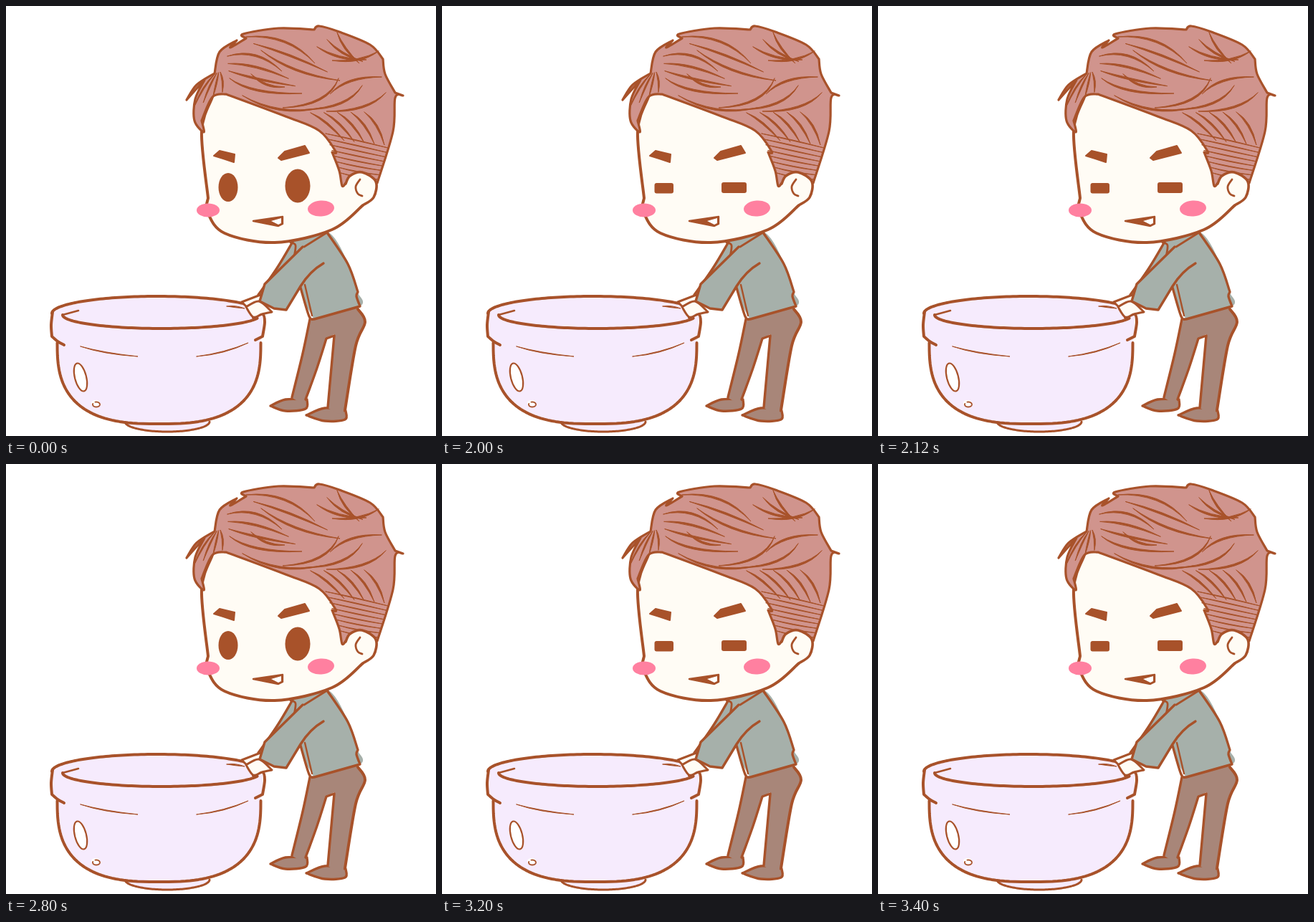
Animation of 600x600 px, one loop 3500 ms. Source, as an HTML page with a canvas:

```html
<!DOCTYPE html>
<html lang="en">
<head>
<meta charset="utf-8">
<title>Blinking beside a bowl</title>
<style>
html, body { margin: 0; width: 100%; height: 100%; overflow: hidden; background: #fff; }
canvas { display: block; width: 100vw; height: 100vh; }
</style>
</head>
<body>
<canvas id="stage" width="600" height="600"></canvas>
<script>
const ctx = document.getElementById('stage').getContext('2d');
const INK = '#a8522a', SKIN = '#fffcf5', HAIR = '#d0948d', SHIRT = '#a6b0aa';
const TROUSERS = '#a88679', BOWL = '#f6ebfd', BLUSH = '#ff80a0';
const LOOP = 3500;
const BLINKS = [[2000, 2200], [3200, 3300], [3400, 3500]];

// Smooth curve through "x,y" points; "|" makes the point before it a corner.
function curve(text) {
  const path = new Path2D();
  let last = null;
  for (const part of text.split('|')) {
    const pts = part.trim().split(/\s+/).map(p => p.split(',').map(Number));
    if (last) pts.unshift(last);
    else path.moveTo(...pts[0]);
    for (let i = 0; i < pts.length - 1; i++) {
      const a = pts[i - 1] || pts[i], b = pts[i], c = pts[i + 1], d = pts[i + 2] || c;
      path.bezierCurveTo(b[0] + (c[0] - a[0]) / 6, b[1] + (c[1] - a[1]) / 6,
        c[0] - (d[0] - b[0]) / 6, c[1] - (d[1] - b[1]) / 6, c[0], c[1]);
    }
    last = pts[pts.length - 1];
  }
  return path;
}

// Arc of a superellipse; power 2 is a plain ellipse.
function arc(x, y, rx, ry, from, to, power = 2) {
  const path = new Path2D(), steps = 80;
  const bend = v => Math.sign(v) * Math.abs(v) ** (2 / power);
  for (let i = 0; i <= steps; i++) {
    const a = Math.PI * (from + (to - from) * i / steps);
    path.lineTo(x + rx * bend(Math.cos(a)), y + ry * bend(Math.sin(a)));
  }
  return path;
}

function fill(path, color) {
  ctx.fillStyle = color;
  ctx.fill(path);
}

function line(path, width = 3.4) {
  ctx.strokeStyle = INK;
  ctx.lineWidth = width;
  ctx.stroke(path);
}

function shape(path, color, width) {
  fill(path, color);
  line(path, width);
}

function oval(x, y, rx, ry, color, turn = 0) {
  const path = new Path2D();
  path.ellipse(x, y, rx, ry, turn, 0, 2 * Math.PI);
  fill(path, color);
}

// Brush stroke, pointed at both ends, bent towards (cx, cy).
function strand([x0, y0, cx, cy, x1, y1], width) {
  const len = Math.hypot(x1 - x0, y1 - y0);
  const nx = (y0 - y1) / len * width, ny = (x1 - x0) / len * width;
  const path = new Path2D();
  path.moveTo(x0, y0);
  path.quadraticCurveTo(cx + nx, cy + ny, x1, y1);
  path.quadraticCurveTo(cx - nx, cy - ny, x0, y0);
  shape(path, INK, 1);
}

// Strands spread evenly from the first to the last.
function lock(first, last, count, width = 2.6) {
  for (let i = 0; i < count; i++) {
    strand(first.map((v, k) => v + (last[k] - v) * i / (count - 1)), width);
  }
}

function drawLegs() {
  shape(curve('369,558 390,549 420,549 | 418,562 390,565 369,558'), TROUSERS);
  shape(curve('419,571 445,561 474,565 | 473,577 445,579 419,571'), TROUSERS);
  fill(curve('424,436 399,547 | 418,550 434,505 447,464 | 458,458 | 449,561 | 472,564 485,485 501,441 489,421'), TROUSERS);
  line(curve('424,437 414,485 399,546'));
  line(curve('418,549 434,505 447,464 | 458,460 | 449,560'));
  line(curve('491,423 501,441 488,474 473,564'), 4);
}

function drawBowl() {
  shape(arc(225, 580, 59, 14, 0, 1), BOWL, 3);
  fill(arc(211, 429, 147, 24, 1, 2), BOWL);
  fill(curve('64,428 | 358,428 | 358,460 | 355,471 | 72,471 | 64,461'), BOWL);
  shape(arc(213.5, 470, 142, 113, 0, 1, 2.75), BOWL, 4);
  line(arc(211, 429, 147, 24, 1, 1.82), 4);
  line(arc(217, 431, 138, 19, 0.08, 1), 4);
  line(curve('65,427 63,445 64,461 | 72,468 81,473'), 4);
  line(curve('345,435 358,430 361,441 358,461 | 348,466'), 4);
  line(curve('79,431 101,425'), 2.6);
  strand([308, 419, 320, 419, 333, 422], 2);
  strand([104, 475, 136, 485, 184, 489], 1.2);
  strand([266, 489, 305, 485, 338, 470], 1.2);
  const glint = new Path2D();
  glint.ellipse(104, 518, 8, 20, -0.25, 0, 2 * Math.PI);
  shape(glint, '#fff', 2.2);
  oval(125, 554, 6, 4, '#fff');
  line(arc(126, 556, 5, 3.5, -0.6, 1.1), 1.8);
}

function drawBody() {
  fill(curve('400,329 | 448,315 478,360 492,402 | 494,419 430,437 | 416,412 411,390 | 352,403'), SHIRT);
  line(curve('448,316 477,360 491,399 | 489,405 494,419 | 430,437 | 423,433 411,393'));
  line(curve('417,389 427,432'), 2.4);
  line(curve('400,329 378,366 352,403 | 360,408'));
  line(curve('397,330 404,334 402,350 | 416,336 | 448,316'), 2.8);
  shape(curve('329,413 | 355,403 | 360,411 337,421 | 329,413'), SKIN, 3);
  shape(curve('335,420 353,412 371,427 | 357,430 345,434 335,420'), SKIN, 3);
  const sleeve = 'M414 336 L361 388 L354 412 L374 422 L391 424 L411 391 Q424 370 443 359';
  fill(new Path2D(sleeve), SHIRT);
  line(new Path2D(sleeve));
}

function drawFace() {
  fill(curve('288,127 273,180 281,280 305,317 375,330 455,311 498,278 | 517,252 | 460,150 | 330,115'), SKIN);
  line(curve('288,127 273,175 282,268 | 281,287 305,317 375,330 455,312 498,278'), 4);
  oval(282, 285, 16, 9.5, BLUSH);
  oval(439.5, 282.5, 18.5, 11, BLUSH, -0.08);
  shape(new Path2D('M290 209 L298 202 L319 207 L318 218 L303 213 Z'), INK, 2);
  shape(new Path2D('M380 212 L389 203 L417 195 L423 205 L384 215 Z'), INK, 2);
  shape(new Path2D('M345 300 L386 294 L386 304 L380 307 Z'), INK, 2.4);
  fill(new Path2D('M370 300 L384 296 L384 303 L380 305 Z'), '#fff');
}

function drawHair() {
  shape(curve('252,131 266,110 291,94 | 298,64 322,48 | 313,58 335,45 | 331,39 380,31 430,33 | 437,28 465,36'
    + ' 508,54 526,74 | 529,95 543,121 | 554,125 | 543,128 540,175 518,247 | 474,247 | 469,251 465,230 455,204'
    + ' | 460,203 437,174 390,154 307,123 | 288,127 273,160 | 276,176 263,160 264,130 277,103 | 252,131'), HAIR, 3.2);
  lock([262, 142, 274, 112, 292, 94], [302, 120, 304, 104, 299, 92], 4, 2);
  lock([309, 70, 350, 58, 385, 91], [312, 101, 341, 124, 413, 122], 4);
  lock([335, 43, 394, 38, 431, 80], [356, 62, 398, 95, 466, 104], 3);
  lock([434, 57, 462, 76, 503, 75], [462, 37, 470, 60, 493, 80], 3);
  lock([520, 63, 494, 80, 455, 76], [524, 99, 475, 98, 452, 123], 2);
  lock([464, 101, 450, 139, 386, 142], [530, 121, 505, 148, 447, 147], 3);
  lock([330, 125, 380, 155, 440, 142], [342, 95, 361, 115, 389, 113], 2);
  lock([425, 149, 448, 160, 472, 188], [500, 148, 520, 163, 528, 194], 5);
  lock([446, 178, 485, 186, 533, 198], [467, 233, 490, 240, 520, 242], 8, 1);
}

function drawEar() {
  const ear = curve('474,248 480,237 497,232 516,245 513,267 498,278');
  shape(ear, SKIN, 3.6);
  line(curve('494,242 488,252 491,262 497,265'), 2.8);
}

function drawEyes(closed) {
  if (closed) {
    ctx.fillStyle = INK;
    ctx.beginPath();
    ctx.roundRect(296.5, 247, 26.5, 14.5, 3);
    ctx.roundRect(390, 246, 35, 15, 3);
    ctx.fill();
  } else {
    oval(310, 253, 13.5, 20, INK);
    oval(407, 251, 17.5, 23.5, INK);
  }
}

function draw(closed) {
  ctx.fillStyle = '#fff';
  ctx.fillRect(0, 0, 600, 600);
  ctx.lineCap = ctx.lineJoin = 'round';
  drawLegs();
  drawBowl();
  drawBody();
  drawFace();
  drawHair();
  drawEar();
  drawEyes(closed);
}

let shown = null;
const start = performance.now();

function tick() {
  const t = (performance.now() - start) % LOOP;
  const closed = BLINKS.some(([from, to]) => t >= from && t < to);
  if (closed !== shown) draw(shown = closed);
  requestAnimationFrame(tick);
}
tick();
</script>
</body>
</html>
```
